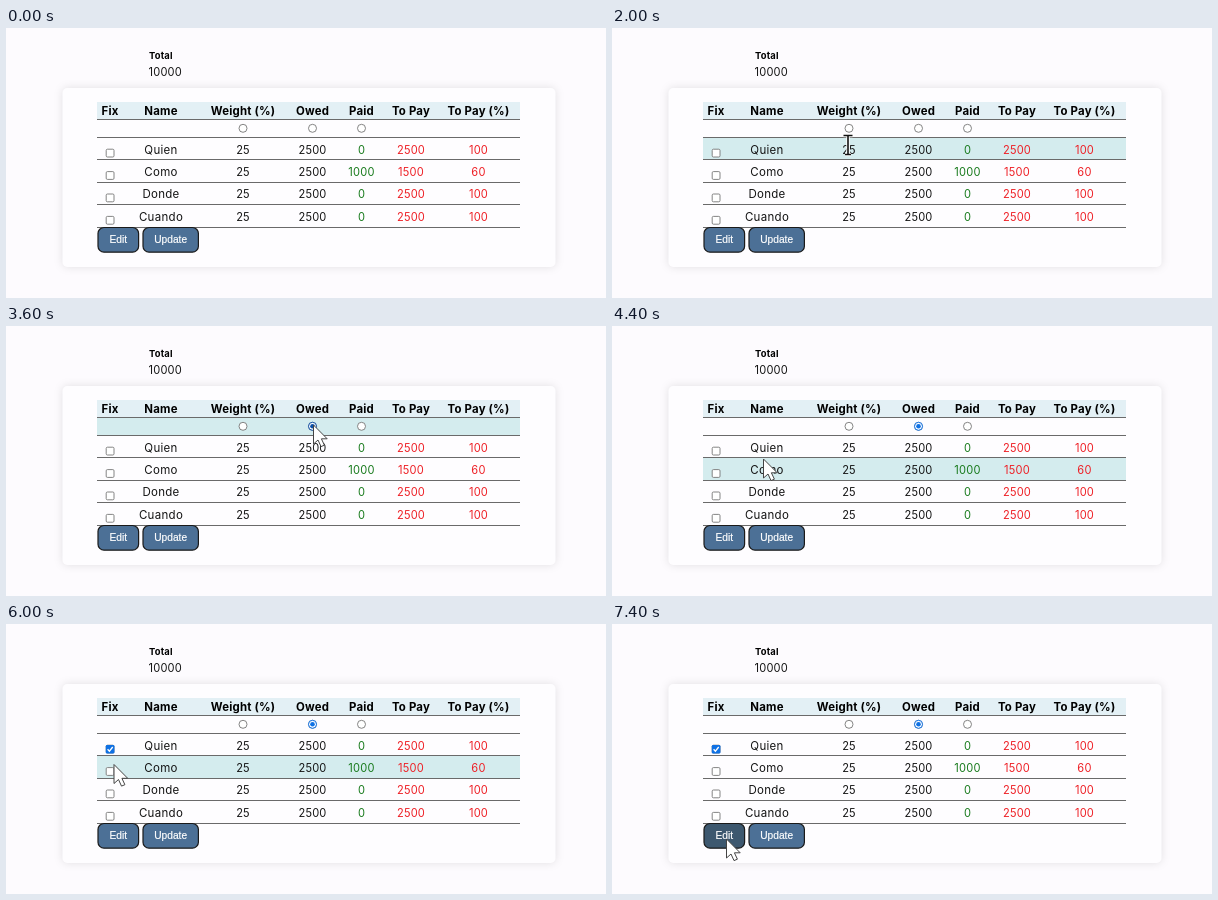
These frames come from a looping animation (600 px wide and 270 px high, 8 s). An HTML page:

```html
<!DOCTYPE html>
<html lang="es">
<head>
<meta charset="utf-8">
<style>
  html, body { margin: 0; width: 100%; height: 100%; overflow: hidden; background: #fdfbfe; }
  svg { display: block; }
  text { font: 11.1px Inter, sans-serif; letter-spacing: .2px; fill: #151515; text-anchor: middle; }
  .name { font-size: 11.5px; letter-spacing: .3px; }
  .head { font-size: 11.4px; font-weight: 700; fill: #000; }
  .left { text-anchor: start; }
  .title { font-size: 9.4px; }
  .due { fill: #ee2026; }
  .paid { fill: #187a1c; }
  .button { fill: #4c7096; stroke: #1a1a1a; stroke-width: 1.2; }
  .label { font: 10.2px "Liberation Sans", Arial, sans-serif; letter-spacing: 0; fill: #fff; stroke: #fff; stroke-width: .2; }
  .line { stroke: #6a6a6a; shape-rendering: crispEdges; }
  .control { fill: #fff; stroke: #777; stroke-width: .9; }
  .card { fill: #fefdff; filter: drop-shadow(0 0 4px #0000001c); }
</style>
</head>
<body>
<svg id="stage" width="600" height="270" viewBox="0 0 600 270"></svg>
<script>
const stage = document.getElementById("stage");

function add(tag, attrs, content = "", parent = stage) {
  const el = document.createElementNS("http://www.w3.org/2000/svg", tag);
  for (const name in attrs) el.setAttribute(name, attrs[name]);
  el.textContent = content;
  return parent.appendChild(el);
}
const box = (x, y, width, height, attrs) => add("rect", { x, y, width, height, ...attrs });
const label = (x, y, content, cls) => add("text", { x, y, class: cls }, content);
const show = (el, on) => el.setAttribute("visibility", on ? "visible" : "hidden");

const blue = "#0f71e4", pressedBlue = "#0b4fa8";
const headings = ["Fix", "Name", "Weight (%)", "Owed", "Paid", "To Pay", "To Pay (%)"];
const columns = [104, 155, 237, 306.5, 355.5, 405, 472.5];
const styles = ["name", "", "", "paid", "due", "due"];
const people = ["Quien", "Como", "Donde", "Cuando"];
const owed = 2500;
const rowHeight = 22.4;
const edges = [91.5, ...Array.from({ length: 5 }, (_, i) => 109.5 + i * rowHeight)];

label(143, 31, "Total", "head left title");
label(142.5, 47.5, "10000", "left");
box(56.5, 60, 493, 179, { rx: 5, class: "card" });
box(91, 74, 423, 17.5, { fill: "#e3f0f5" });
const highlight = box(91, 0, 423, 0, { fill: "#d4ecee" });
headings.forEach((heading, i) => label(columns[i], 86.6, heading, "head"));
edges.forEach(y => add("path", { d: `M91 ${y}H514`, class: "line" }));

const radio = (x, r, attrs) => add("circle", { cx: x, cy: 100.3, r, ...attrs });
for (const x of columns.slice(2, 5)) radio(x, 4, { class: "control" });
const radioRing = radio(columns[3], 4, { fill: "#fff" });
const radioDot = radio(columns[3], 2.3);

people.forEach((name, i) => {
  const y = 125.5 + i * rowHeight;
  const paid = name === "Como" ? 1000 : 0;
  const due = owed - paid;
  const cells = [name, 100 / people.length, owed, paid, due, due / owed * 100];
  cells.forEach((value, j) => label(columns[j + 1], y, value, styles[j]));
  box(100.2, y - 4.3, 7.8, 7.8, { rx: 1.2, class: "control" });
});
const check = add("g", {});
add("rect", { x: 99.8, y: 120.9, width: 8.6, height: 8.6, rx: 1.3, fill: blue }, "", check);
add("path", { d: "M101.6 125.3l1.8 1.9 3.3-4.2", fill: "none", stroke: "#fff", "stroke-width": 1.3 }, "", check);

function button(x, width, content) {
  const face = box(x, 199.5, width, 24.7, { rx: 6, class: "button" });
  label(x + width / 2, 215.2, content, "label");
  return face;
}
const editButton = button(92, 40.6, "Edit");
button(137, 55.4, "Update");

const arrow = add("path", {
  d: "M.5 0V19L5 15 8 21.6 11.4 20.2 8.4 13.8H14.2Z",
  fill: "#fff", stroke: "#444", "stroke-linejoin": "round"
});
const beam = add("g", {});
for (const [stroke, width] of [["#fff", 3.4], ["#111", 1.6]])
  add("path", { d: "M-4.5-9.5H4.5M0-9.5V9.5M-3 9.5H3", stroke, "stroke-width": width }, "", beam);

// The pointer glides between these stops
const stop = (arrive, leave, x, y) => ({ arrive, leave, x, y });
const stops = [
  stop(200, 200, 250, 203),
  stop(1000, 1200, 160, 53),
  stop(1600, 1800, 235, 170),
  stop(2000, 2000, 236, 117),
  stop(2600, 3000, 237, 100),
  stop(3600, 3600, 307, 99),
  stop(4000, 4200, 303, 112),
  stop(4400, 4400, 151, 133),
  stop(5200, 5600, 104, 121),
  stop(6400, 6400, 111, 160),
  stop(6800, 7200, 113, 197),
  stop(7400, 8000, 114, 215)
];

function pointerAt(time) {
  const i = stops.findLastIndex(s => s.arrive <= time);
  const from = stops[i], to = stops[i + 1];
  if (!to || time <= from.leave) return from;
  const k = (time - from.leave) / (to.arrive - from.leave);
  return { x: from.x + (to.x - from.x) * k, y: from.y + (to.y - from.y) * k };
}

function draw(time) {
  const visible = time >= stops[0].arrive;
  const { x, y } = pointerAt(Math.max(time, stops[0].arrive));
  const row = edges.findLastIndex(edge => edge <= y);
  const inTable = visible && row >= 0 && row < edges.length - 1;
  const middle = (edges[row] + edges[row + 1]) / 2;
  const overText = inTable && row > 0 && Math.abs(y - middle) < 9.5 &&
    columns.slice(1).some(column => Math.abs(column - x) < 14);

  show(arrow, visible && !overText);
  show(beam, overText);
  for (const pointer of [arrow, beam]) pointer.setAttribute("transform", `translate(${x} ${y})`);

  show(highlight, inTable);
  if (inTable) {
    highlight.setAttribute("y", edges[row]);
    highlight.setAttribute("height", edges[row + 1] - edges[row]);
  }

  const radioColor = time === 3600 ? pressedBlue : blue;
  radioRing.setAttribute("stroke", radioColor);
  radioDot.setAttribute("fill", radioColor);
  for (const part of [radioRing, radioDot]) show(part, time >= 3600);
  show(check, time >= 5800);
  editButton.style.fill = time >= 7400 ? "#3d586f" : "";
}

const step = 200, loop = 8000;
const start = performance.now();
function tick() {
  const time = (performance.now() - start) % loop;
  draw(Math.floor(time / step) * step);
  requestAnimationFrame(tick);
}
tick();
</script>
</body>
</html>
```
